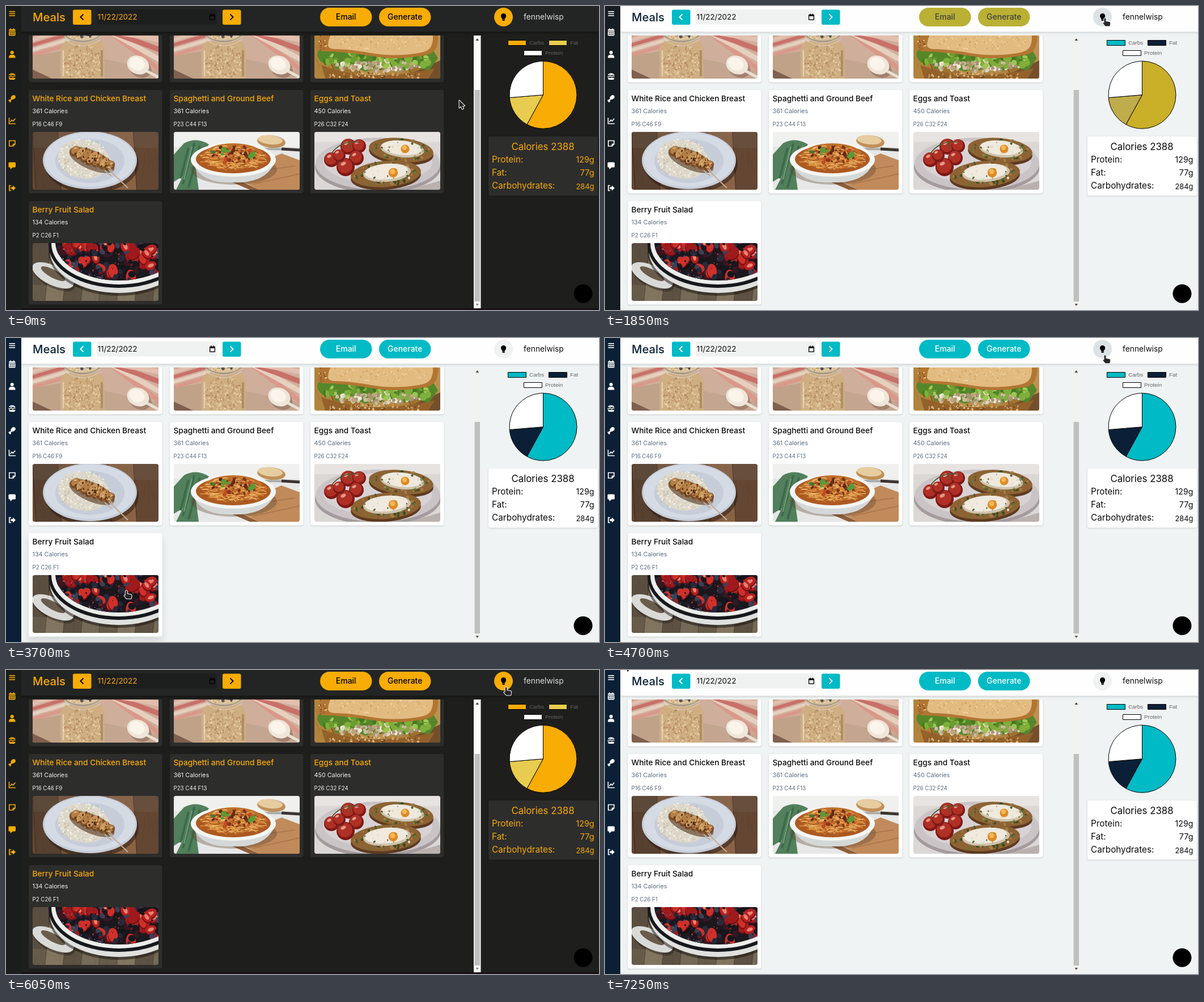
An HTML page with a canvas for the animation above (7600 ms loop, 1046 px wide and 536 px high).

```html
<!DOCTYPE html>
<html lang="en">
<head>
<meta charset="utf-8">
<title>Meals</title>
<style>
html, body { margin: 0; width: 100%; height: 100%; overflow: hidden; background: #1e1f1d; }
canvas { display: block; }
</style>
</head>
<body>
<canvas id="stage" width="1046" height="536"></canvas>
<script>
const W = 1046, H = 536, LOOP = 7600, STEP = 50;
const UI = 'Inter, "Open Sans", sans-serif';
const CHART = '"Liberation Sans", Arial, sans-serif';
const DARK = {
  bg: '#1e1f1d', head: '#232524', side: '#1b1d1d', card: '#2d2d2c', main: '#f8ac04', fat: '#e8cc50',
  title: '#f8ac04', sub: '#f0f0f0', name: '#dcdcdc', icon: '#f8ac04', date: '#1d1e1e', glyph: '#000000',
  legend: '#636564', track: '#fbfbfa', bulb: '#f8ac04'
};
const LIGHT = {
  bg: '#eff3f3', head: '#fdfefd', side: '#0b2036', card: '#ffffff', main: '#00bac5', fat: '#0b2036',
  title: '#0a0a0a', sub: '#5b6c83', name: '#101010', icon: '#ffffff', date: '#f0f1f1', glyph: '#ffffff',
  legend: '#666666', track: '#f2f3f1', bulb: '#f0f1f1'
};
const SWITCHES = [-9000, 1850, 5150, 6150];   // even entries turn dark, odd ones light
const PATH = [                                // time, x, y of the pointer
  [0, 799, 166], [550, 799, 166], [1300, 880, 20], [2250, 880, 20], [2650, 766, 124],
  [2900, 575, 238], [3150, 300, 292], [3400, 66, 340], [3600, 110, 440], [3800, 340, 416],
  [4000, 620, 258], [4200, 846, 128], [4300, 874, 94], [4480, 904, 42], [4700, 880, 29],
  [6650, 880, 29], [6900, 640, 30], [7250, 34, -13], [7600, 34, -13]
];
const MEALS = [
  ['oats', 0, 0], ['oats', 1, 0], ['sandwich', 2, 0],
  ['chicken', 0, 1, 'White Rice and Chicken Breast', '361 Calories', 'P16 C46 F9'],
  ['pasta', 1, 1, 'Spaghetti and Ground Beef', '361 Calories', 'P23 C44 F13'],
  ['eggs', 2, 1, 'Eggs and Toast', '450 Calories', 'P26 C32 F24'],
  ['berries', 0, 2, 'Berry Fruit Salad', '134 Calories', 'P2 C26 F1']
].map(([photo, col, row, ...lines]) => ({ photo, lines, x: 40 + col * 248.7, y: -48 + row * 196.2 }));
const CARD_W = 235.5, CARD_H = 182.5;

const stage = document.getElementById('stage').getContext('2d');
let g = stage, seed = 1;
const rnd = () => (seed = (seed * 16807) % 2147483647) / 2147483647;
const clamp = v => Math.max(0, Math.min(1, v));

function mix(a, b, k) {
  const ch = (c, i) => parseInt(c.slice(i, i + 2), 16);
  return `rgb(${[1, 3, 5].map(i => Math.round(ch(a, i) + (ch(b, i) - ch(a, i)) * k))})`;
}
function rect(x, y, w, h, color, r = 0) {
  g.fillStyle = color;
  g.beginPath();
  g.roundRect(x, y, w, h, r);
  g.fill();
}
function ell(x, y, rx, ry, color, rot = 0) {
  g.fillStyle = color;
  g.beginPath();
  g.ellipse(x, y, rx, ry, rot, 0, 7);
  g.fill();
}
const dot = (x, y, r, color) => ell(x, y, r, r, color);
function shape(d, color) {
  g.fillStyle = color;
  g.fill(new Path2D(d));
}
function line(d, color, width = 1) {
  g.strokeStyle = color;
  g.lineWidth = width;
  g.stroke(new Path2D(d));
}
function text(s, x, y, size, color, weight = 400, align = 'left', font = UI) {
  g.font = `${weight} ${size}px ${font}`;
  g.textAlign = align;
  g.fillStyle = color;
  g.fillText(s, x, y);
}
function shadow(color, blur, dy) {
  g.shadowColor = color;
  g.shadowBlur = blur;
  g.shadowOffsetY = dy;
}
const noShadow = () => shadow('transparent', 0, 0);

// ---- photos, 222 x 102 ----
function scatter(n, cx, cy, rx, ry, cols, min, max) {
  for (let i = 0; i < n; i++) {
    const a = rnd() * 6.283, d = Math.sqrt(rnd()), r = min + rnd() * (max - min);
    ell(cx + Math.cos(a) * d * rx, cy + Math.sin(a) * d * ry, r, r * (.5 + rnd() * .5),
      cols[Math.floor(rnd() * cols.length)], rnd() * 3);
  }
}
function wood(cols, n, lean = 0) {
  const w = 222 / n;
  for (let i = -1; i <= n; i++) {
    const x = i * w;
    shape(`M${x} 0h${w + 1}l${lean} 102h${-w - 1}z`, cols[(i + 1) % cols.length]);
    line(`M${x} 0l${lean} 102`, 'rgba(40,25,15,.5)', 1.2);
  }
  for (let i = 0; i < 60; i++) {
    const x = rnd() * 222, y = rnd() * 90;
    line(`M${x} ${y}l${lean / 5} 20`, 'rgba(50,30,20,.14)');
  }
}
const PHOTOS = {
  oats() {
    rect(0, 0, 222, 102, '#d0ae9c');
    ['#d9998a', '#e6cfbd', '#c9706a', '#e2bfae', '#c79c8c'].forEach((c, i) => {
      line(`M-5 ${62 - i * 9}L70 ${40 - i * 9}`, c, 6);
      line(`M112 ${2 + i * 4}L232 ${92 - i * 19}`, c, 9);
    });
    shape('M0 62L60 52L75 102H0z', '#bfa288');
    shape('M120 66L222 88V102H110z', '#c4a590');
    shape('M0 86l34 16H0z', '#80604f');
    ell(190, 84, 20, 16, 'rgba(100,65,50,.35)', .4);
    line('M200 88L226 102', '#e9dfd2', 5);
    ell(186, 78, 20, 16, '#efe6da', .4);
    ell(184, 76, 14, 11, '#faf4ea', .4);
    shape('M58 36H118Q127 42 127 56V110H49V56Q49 42 58 36z', '#cfae82');
    scatter(260, 88, 74, 35, 32, ['#dcc197', '#c09a6c', '#e6cfa8', '#b68e62'], .7, 2.2);
    ell(88, 24, 32, 15, '#a99a88');
    ell(88, 23, 29, 12, '#d9c29a');
    scatter(60, 88, 24, 26, 9, ['#e6d1aa', '#bf9c70'], .8, 2);
    scatter(8, 92, 25, 13, 5, ['#33303a', '#57505e'], 3, 5);
    line('M56 28Q88 50 120 28M56 33Q88 55 120 33', '#d8c9b4', 1.5);
    line('M54 52V98', 'rgba(255,255,255,.4)', 2.5);
    line('M122 52V98', 'rgba(110,80,50,.35)', 4);
  },
  sandwich() {
    wood(['#b1843d', '#a0722f', '#bd9250'], 5, 40);
    shape('M150 102L222 70V102z', '#74502a');
    shape('M12 78Q60 96 110 96T212 84L200 104H20z', '#94612a');
    scatter(70, 112, 98, 92, 7, ['#c39455', '#6e4320', '#dfbd85'], .8, 2.4);
    shape('M8 52Q0 62 14 74L26 68L40 86L62 78L90 90L122 80L150 90L180 82L202 88L218 66L206 46z', '#55872a');
    scatter(55, 108, 68, 98, 15, ['#82b23d', '#44761f', '#a2c957', '#6a9c31'], 3, 7);
    scatter(120, 112, 80, 76, 10, ['#e2d5be', '#cdbd9f', '#f1e9da', '#a8926f', '#bfa47c'], 2, 4.5);
    scatter(14, 112, 72, 96, 10, ['#7fae3c', '#9cc552'], 4, 8);
    shape('M6 44Q8 20 40 4H206Q224 22 216 44Q212 60 188 62Q140 70 100 62Q50 54 18 54Q6 54 6 44z', '#b27633');
    shape('M24 42Q26 18 50 4H198Q214 24 207 42Q204 54 184 57Q140 64 100 57Q60 50 38 50Q24 50 24 42z', '#e2bb81');
    scatter(170, 116, 34, 86, 18, ['#ecca97', '#d3a468', '#f1d7aa'], .6, 1.8);
    scatter(18, 14, 42, 8, 9, ['#e6c892', '#7b4c1f'], .8, 1.6);
  },
  chicken() {
    wood(['#644733', '#57402f', '#74543c', '#7d5a41', '#8a6345'], 5, 6);
    rect(0, 0, 222, 28, 'rgba(120,110,100,.18)');
    ell(104, 56, 83, 52, 'rgba(25,15,10,.45)');
    ell(101, 50, 83, 51, '#c6cdd9');
    ell(101, 49, 80, 48, '#d5dbe5');
    ell(101, 51, 61, 39, '#c6cdd9');
    ell(90, 48, 46, 34, '#ddd8ca', .2);
    scatter(340, 90, 47, 46, 34, ['#efebdf', '#d3ccba', '#f8f4e8', '#c4bda9'], .8, 1.9);
    g.save();
    g.translate(106, 46);
    g.rotate(.4);
    ell(0, 4, 43, 17, 'rgba(80,50,25,.6)');
    for (let i = -3; i <= 3; i++) {
      ell(i * 11, 1, 8, 15 - Math.abs(i) * 1.6, '#7a4a24', .35);
      ell(i * 11 - 1, -1, 6, 13 - Math.abs(i) * 1.6, i % 2 ? '#b57f46' : '#c7975c', .35);
    }
    scatter(80, 0, 0, 40, 13, ['#6a3a18', '#dcb27a', '#472c14', '#8f5a2c'], .7, 2.2);
    g.restore();
    line('M134 66L168 99M127 68l12 10M134 61l8 10', '#c3ab97', 2);
  },
  pasta() {
    rect(0, 0, 222, 102, '#e6e7e6');
    rect(0, 0, 222, 26, '#f0f0ef');
    shape('M18 20Q40 8 62 22L38 58L44 102H4L16 78L0 88V40z', '#52805c');
    line('M26 28L12 82M46 24L26 98M36 20L16 92', '#3d6a4a', 4);
    line('M32 26L18 84', '#74a07c', 2);
    shape('M100 76L190 38L222 50V102H150z', '#c08a5a');
    shape('M100 78L150 102H134L92 84z', '#8f5e38');
    line('M128 72L214 60M140 92L222 74', '#a8734a', 1.5);
    ell(172, 17, 25, 11, '#bf9058', .1);
    ell(170, 14, 22, 8, '#e6cda0', .1);
    line('M160 30L222 31', '#a9abad', 4);
    line('M190 30L222 32', '#3b3431', 5);
    ell(106, 66, 76, 27, 'rgba(90,65,45,.35)');
    shape('M30 46Q42 88 92 89H118Q170 86 180 46z', '#d5d8d8');
    ell(105, 49, 75, 30, '#f4f5f3');
    ell(105, 48, 66, 25, '#ad5a22');
    ell(105, 43, 54, 23, '#c0702c');
    for (let i = 0; i < 190; i++) {
      const a = rnd() * 6.283, d = Math.sqrt(rnd()), x = 98 + Math.cos(a) * d * 56, y = 47 + Math.sin(a) * d * 20;
      line(`M${x} ${y}q7 ${-9 + rnd() * 12} 14 ${rnd() * 10 - 5}`, ['#e3a650', '#d98a38', '#a1481c', '#efbf74'][i % 4], 1.3);
    }
    scatter(45, 106, 40, 42, 15, ['#93321a', '#7a3317', '#c14c24', '#5d2812'], 1.5, 4);
    scatter(6, 104, 38, 38, 12, ['#3f7a2d', '#5d9937'], 3, 5.5);
  },
  eggs() {
    rect(0, 0, 222, 102, '#dad7d5');
    rect(0, 0, 222, 18, '#e6e3e0');
    ell(112, 62, 111, 46, '#a39b9d');
    ell(112, 56, 110, 46, '#cbc4c7');
    ell(112, 53, 96, 37, '#d8d2d5');
    const toast = (x, y, w, h, rot, yolk) => {
      ell(x, y + 5, w, h, '#5d3b20', rot);
      ell(x, y, w, h, '#8d6334', rot);
      scatter(70, x, y, w * .92, h * .88, ['#3d4a22', '#6b7337', '#a77b45', '#4f5c2a'], 1.5, 4);
      ell(x + 2, y - 2, w * .68, h * .7, '#cfc3ae', rot);
      ell(x + 1, y - 4, w * .62, h * .6, '#efe9de', rot);
      scatter(22, x, y, w * .75, h * .7, ['#556130', '#e2dac9', '#8a8c52'], 1, 2.6);
      dot(yolk, y - 2, h * .36, '#de8a24');
      dot(yolk - 1, y - 4, h * .2, '#f3b756');
    };
    toast(153, 32, 57, 21, .1, 160);
    toast(126, 74, 62, 23, -.08, 139);
    [[60, 26, 14], [79, 25, 12], [30, 49, 13], [74, 46, 13], [55, 62, 16], [44, 42, 11]].forEach(([x, y, r]) => {
      dot(x, y, r, '#7d1915');
      dot(x - 1, y - 2, r * .82, '#b03026');
      ell(x - 4, y - 6, r * .3, r * .18, '#e59a88', -.5);
    });
    line('M30 38q18 -24 48 -20M60 20l5 9', '#4e5a2f', 1.8);
    shape('M166 102L222 86V102z', '#b9b1ae');
  },
  berries() {
    wood(['#6c6150', '#5a4e40', '#7c6f5c', '#4c4136'], 7, -10);
    rect(0, 74, 222, 28, 'rgba(150,135,110,.22)');
    ell(38, 62, 40, 17, 'rgba(25,20,15,.4)', .45);
    ell(36, 57, 40, 17, '#d9dad7', .45);
    ell(36, 54, 24, 7, '#6a5c4c', .5);
    ell(152, 16, 124, 77, 'rgba(20,15,12,.5)');
    ell(152, 12, 122, 76, '#dfe1df');
    ell(152, 3, 124, 76, '#17181b');
    ell(152, 1, 119, 72, '#eceeec');
    ell(152, -2, 112, 68, '#1b171d');
    g.save();
    g.beginPath();
    g.ellipse(152, -2, 112, 68, 0, 0, 7);
    g.clip();
    scatter(80, 145, 18, 104, 50, ['#1b1a22', '#2a2939', '#121217', '#3a1720'], 6, 10);
    for (let i = 0; i < 34; i++) {
      const x = 55 + rnd() * 165, y = rnd() * 60, r = 7 + rnd() * 6, rot = rnd() * 3;
      ell(x, y + 2, r, r * .75, '#6d1217', rot);
      ell(x, y, r, r * .68, ['#b8211f', '#cf3029', '#a01a1d'][i % 3], rot);
      if (i % 3 === 0) ell(x, y, r * .55, r * .3, '#e98272', rot);
    }
    scatter(48, 145, 24, 100, 42, ['#17171e', '#26283a', '#3b4055'], 4, 7);
    scatter(90, 145, 22, 100, 42, ['#565c72', '#0e0e13', '#d9574a'], .7, 1.6);
    g.restore();
  }
};
const prints = {};
Object.keys(PHOTOS).forEach((key, i) => {
  const c = document.createElement('canvas');
  c.width = 222;
  c.height = 102;
  g = c.getContext('2d');
  seed = 977 * (i + 3);
  g.beginPath();
  g.roundRect(0, 0, 222, 102, 4);
  g.clip();
  PHOTOS[key]();
  prints[key] = c;
});
g = stage;

// ---- pointer ----
function pointer(t) {
  let i = 0;
  while (i < PATH.length - 2 && PATH[i + 1][0] <= t) i++;
  const a = PATH[i], b = PATH[i + 1], d = b[0] - a[0], u = clamp((t - a[0]) / d);
  const slope = (j, k) => {
    const p = PATH[j - 1], q = PATH[j + 1], c = PATH[j];
    const still = o => !o || (o[1] === c[1] && o[2] === c[2]);
    return still(p) || still(q) ? 0 : (q[k] - p[k]) / (q[0] - p[0]) * d;
  };
  return [1, 2].map(k =>
    a[k] * (2 * u ** 3 - 3 * u * u + 1) + b[k] * (3 * u * u - 2 * u ** 3) +
    slope(i, k) * (u ** 3 - 2 * u * u + u) + slope(i + 1, k) * (u ** 3 - u * u));
}
const within = ([px, py], x, y, w, h) => px >= x && px < x + w && py >= y && py < y + h;
const onCard = (p, m) => p[1] > 52 && within(p, m.x, m.y, CARD_W, CARD_H);
const onBulb = p => Math.hypot(p[0] - 877.5, p[1] - 19.5) < 16.5;
function lift(t, m) {
  let n = 0;
  for (let k = 0; k < 4; k++) n += onCard(pointer(Math.max(0, t - k * 50)), m) / 4;
  return n;
}
function drawPointer(p) {
  const hand = onBulb(p) || MEALS.some(m => onCard(p, m)) ||
    [[554, 3, 91, 33], [658, 3, 91, 33], [118, 6, 32, 27], [382, 6, 32, 27]].some(b => within(p, ...b));
  const d = hand
    ? 'M0 2q1.5 -2.6 3 0V6.5l6 1q2 .5 1.8 2.4l-1 5H2L-2.1 10.1q.2 -2 2.1 -.8z'
    : 'M0 0V13L3 10.3L5.2 15.4L7.6 14.3L5.5 9.4H9.6z';
  g.save();
  g.translate(p[0] + .5, p[1] + .5);
  g.lineJoin = 'round';
  line(d, '#ffffff', 2);
  shape(d, '#262626');
  g.restore();
}

// ---- interface ----
function sidebar(th, side) {
  const c = th.icon;
  rect(0, 0, 27, H, side);
  [9, 12.6, 16.2].forEach(y => rect(5.5, y, 10.5, 1.6, c));
  rect(5, 41, 11.5, 11.5, c, 1.5);                         // calendar
  [7, 12.6].forEach(x => rect(x, 39.5, 1.8, 3, c));
  rect(5, 43.6, 11.5, 1, side);
  [46, 49].forEach(y => [6.6, 9.8, 13].forEach(x => rect(x, y, 1.9, 1.8, side)));
  dot(10.7, 82, 3, c);                                     // person
  shape('M5 91.5q0 -5.5 4 -5.5h3.5q4 0 4 5.5z', c);
  shape('M5 122q1 -3.5 5.8 -3.5t5.8 3.5z', c);             // burger
  line('M4.5 124.2q1.5 1.6 3 0t3 0t3 0t3 0', c, 1.4);
  shape('M5 126.7h11.6q-.6 3.4 -3 3.4H8q-2.4 0 -3 -3.4z', c);
  [8, 10.8, 13.6].forEach(x => dot(x, 120.6, .6, side));
  ell(12.7, 161, 4.4, 3.4, c, -.7);                        // drumstick
  line('M10.5 163L6.5 167.5', c, 2.4);
  dot(6, 166.6, 1.5, c);
  dot(7.4, 168.2, 1.5, c);
  line('M5.5 197V207.5H17M7.5 204.5l3 -3.5l2 2l3.8 -4.5', c, 1.6);
  line('M5.8 237.5H16V243.5L12.5 247H5.8zM16 243.5H12.5V247', c, 1.6);
  rect(4.5, 275.5, 12.5, 9, c, 1.6);                       // comment
  shape('M7 284h5l-4 4z', c);
  line('M9 316.5H6V325.5H9', c, 1.7);
  shape('M8.5 319.3H12V316.2L17 321L12 325.8V322.7H8.5z', c);
}
function header(th, dark, p, btn, btnText) {
  shadow(dark ? 'rgba(0,0,0,.5)' : 'rgba(0,0,0,.16)', 4, 1);
  rect(27, 0, W, 45.5, th.head);
  noShadow();
  text('Meals', 47, 26.5, 20.2, dark ? th.main : '#0b2036', 500);
  rect(160, 6, 212, 26.5, th.date, 3);
  text('11/22/2022', 161.5, 24, 13.4, dark ? th.main : '#0a0a0a');
  rect(359, 15, 10, 10, '#000', 1);
  rect(360.3, 18, 7.4, 5.7, th.date);
  rect(361, 13.5, 1.6, 2, '#000');
  rect(365.5, 13.5, 1.6, 2, '#000');
  [[118, 1], [382, -1]].forEach(([x, s]) => {
    rect(x, 6.5, 32.5, 26.5, th.main, 3);
    const m = x + 16;
    line(`M${m + 2.5 * s} 14.5L${m - 2.5 * s} 19.5L${m + 2.5 * s} 24.5`, th.glyph, 1.9);
  });
  [[554, 'Email'], [658, 'Generate']].forEach(([x, s]) => {
    rect(x, 3, 91.5, 33, btn, 16.5);
    text(s, x + 45.7, 24, 14, btnText, 500, 'center');
  });
  dot(877.5, 19.5, 16.5, !dark && onBulb(p) ? '#dde3e5' : th.bulb);
  shape('M873 17.5a4.6 4.6 0 0 1 9.2 0q0 2.2 -1.6 3.7l-.8 2h-4.4l-.8 -2q-1.6 -1.5 -1.6 -3.7z', '#000');
  rect(875.4, 23.6, 4.4, 2.4, '#000', 1);
  text('fennelwisp', 913, 24, 13.8, th.name);
}
function cards(th, dark, t) {
  g.save();
  g.beginPath();
  g.rect(27, 52, 811, 484);
  g.clip();
  for (const m of MEALS) {
    const up = lift(t, m), x = Math.round(m.x), y = Math.round(m.y);
    shadow(`rgba(0,0,0,${.17 - up * .05})`, 3 + up * 11, 1 + up * 7);
    rect(x, y, CARD_W, CARD_H, th.card, 4);
    noShadow();
    g.drawImage(prints[m.photo], x + 7, y + 74);
    if (!m.lines.length) continue;
    text(m.lines[0], x + 6.5, y + 20, 13.7, th.title, 500);
    text(m.lines[1], x + 6.5, y + 41, 10.8, th.sub);
    text(m.lines[2], x + 6.5, y + 63.5, 9.7, th.sub);
  }
  g.restore();
  rect(825, 52, 12.5, 481, th.track);
  rect(826.5, 148, 9.5, 373, '#bfbfbf');
  shape('M828.3 61h6l-3 -4z', '#4a4a4a');
  shape('M828.3 525h6l-3 4z', dark ? '#8f8f8f' : '#5a5a5a');
}
function chart(th, carbs, fat) {
  const key = (s, x, y, c) => {
    rect(x, y, 33, 10, c);
    line(`M${x + .5} ${y + .5}h32v9h-32z`, '#000');
    text(s, x + 38, y + 8, 9.84, th.legend, 400, 'left', CHART);
  };
  key('Carbs', 885, 60, th.main);
  key('Fat', 957, 60, th.fat);
  key('Protein', 913, 78, '#ffffff');
  let a = -Math.PI / 2;
  [[284, carbs], [77, fat], [129, '#ffffff']].forEach(([n, c]) => {
    const b = a + n / 490 * 2 * Math.PI;
    g.beginPath();
    g.moveTo(947.5, 156.7);
    g.arc(947.5, 156.7, 59.5, a, b);
    g.closePath();
    g.fillStyle = c;
    g.fill();
    g.strokeStyle = '#000';
    g.lineWidth = 1;
    g.stroke();
    a = b;
  });
}
function totals(th) {
  shadow('rgba(0,0,0,.17)', 3, 1);
  rect(851, 230, 193, 104.5, th.card, 3);
  noShadow();
  text('Calories 2388', 947, 254, 16.8, th.title, 400, 'center');
  [['Protein:', '129g', 14.2], ['Fat:', '77g', 14.4], ['Carbohydrates:', '284g', 12.9]].forEach(([k, v, size], i) => {
    const y = 276 + i * 23;
    text(k, 857, y, 15.3, th.title);
    text(v, 1037.5, y + (i === 2 ? .5 : 0), size, th.title, 400, 'right');
  });
}

function draw(t) {
  const n = SWITCHES.filter(s => s <= t).length - 1, dark = n % 2 === 0;
  const th = dark ? DARK : LIGHT, old = dark ? LIGHT : DARK;
  const since = t - SWITCHES[n] + 50;
  const fast = clamp(since / 200), slow = 1 - (1 - clamp(since / 1000)) ** 4;
  const fade = (k, amount) => mix(old[k], th[k], amount);
  const p = pointer(t);
  rect(0, 0, W, H, th.bg);
  cards(th, dark, t);
  if (dark) rect(0, 533.5, W, 3, '#150f13');
  header(th, dark, p, fade('main', fast), fade('glyph', fast));
  sidebar(th, fade('side', fast));
  chart(th, fade('main', slow), fade('fat', slow));
  totals(th);
  dot(1018, 507.2, 16.5, '#000');
  drawPointer(p);
}

const start = performance.now();
function tick() {
  const t = (performance.now() - start) % LOOP;
  draw(Math.floor(t / STEP) * STEP);
  requestAnimationFrame(tick);
}
tick();
</script>
</body>
</html>
```
